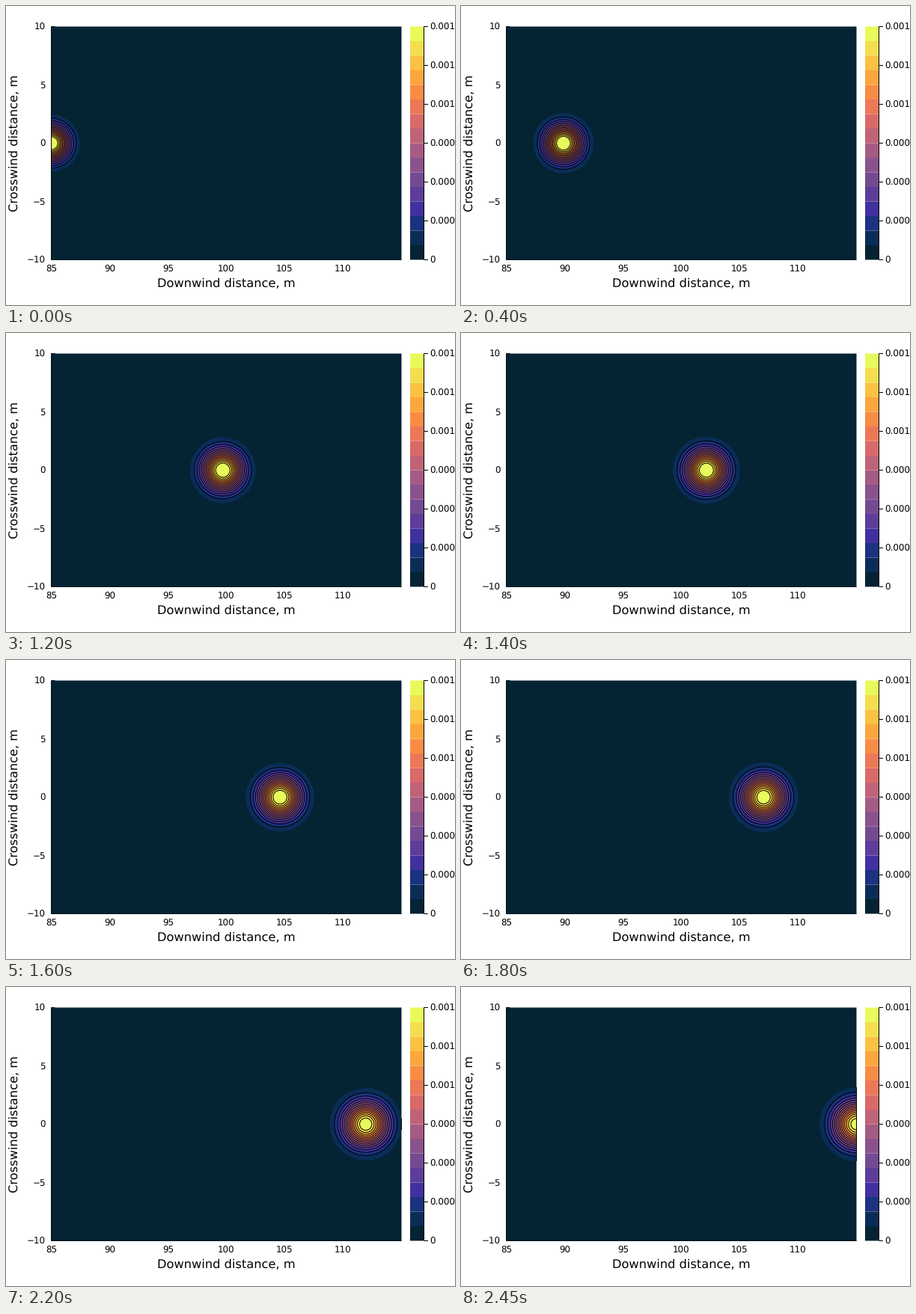
Animation, 600 px wide and 400 px high, one loop 2.5 s. Source, as a matplotlib script:

```python
import numpy as np
import matplotlib.pyplot as plt
from matplotlib.animation import FuncAnimation
from matplotlib.patches import Circle, Rectangle

plt.rcParams["font.family"] = "DejaVu Sans"
plt.rcParams["text.hinting"] = "none"

FRAMES = 50
PX = 0.72                      # one pixel in points at 100 dpi
SCALE = 15.6                   # pixels per metre
LEFT, RIGHT, TOP, BOTTOM = 60.5, 528.5, 27.5, 339.5
MID = (TOP + BOTTOM) / 2
DROP = 4.7                     # from a tick to its label's baseline

COLORS = ["#042333", "#092d57", "#1b3280", "#40319f", "#5d3d99", "#744a92",
          "#8b528c", "#a55b84", "#bf6377", "#d86a69", "#eb7958", "#f88c46",
          "#fca63d", "#fac142", "#f3de4f", "#e8fa5b"]
BANDS = len(COLORS)

fig = plt.figure(figsize=(6, 4), dpi=100, facecolor="white")
ax = fig.add_axes([0, 0, 1, 1])
ax.set_xlim(0, 600)
ax.set_ylim(400, 0)
ax.axis("off")


def line(xs, ys, z):
    return ax.plot(xs, ys, color="black", lw=PX, solid_capstyle="butt",
                   snap=False, zorder=z)[0]


def box(x0, y0, x1, y1, color, z=1):
    patch = Rectangle((x0, y0), x1 - x0, y1 - y0, fc=color, ec="none", lw=0,
                      snap=False, zorder=z)
    return ax.add_patch(patch)


def label(x, y, text, ha="center", size=11.85, rotation=0):
    ax.text(x, y, text, ha=ha, va="baseline", fontsize=size * PX,
            rotation=rotation, rotation_mode="anchor", color="black")


# Plot area and axes
area = box(LEFT, TOP, RIGHT, BOTTOM, COLORS[0])
line([LEFT, RIGHT], [BOTTOM, BOTTOM], 0.5)
line([LEFT, LEFT], [TOP, BOTTOM], 0.5)
line([LEFT, LEFT + 5], [TOP, TOP], 0.5)
for value in range(85, 111, 5):
    label(LEFT + (value - 85) * SCALE, 355.7, str(value))
for value in range(-10, 11, 5):
    label(53, MID - value * SCALE + DROP, str(value).replace("-", "\u2212"), "right")
label(294.3, 375.8, "Downwind distance, m", size=16.25)
label(16.5, MID, "Crosswind distance, m", size=16.25, rotation=90)

# Colour bar
step = (BOTTOM - TOP) / BANDS
for k, color in enumerate(COLORS):
    y = BOTTOM - k * step
    box(540, y - step, 558, y, color)
line([558.5, 558.5], [TOP, BOTTOM], 3)
for k in range(7):
    y = BOTTOM - 52 * k
    line([558.5, 564], [y, y], 3)
    label(566, y + DROP, f"{k * 0.00025:.5f}" if k else "0", "left")

# Puff: one disc per contour level, outlined above the lowest
discs = []
for k in range(1, BANDS):
    disc = Circle((0, 0), 1, fc=COLORS[k], ec="black" if k > 1 else "none",
                  lw=PX, zorder=2 + k * 0.01)
    ax.add_patch(disc)
    disc.set_clip_path(area)
    discs.append(disc)
edges = [line([x, x], [MID, MID], 4) for x in (LEFT, RIGHT)]


def log_peak(x):
    """Ground-level puff maximum for a release 1.53 m high."""
    sigma_z = 0.05 * x ** 0.61
    return -2.39 * np.log(x) - 1.53 ** 2 / (2 * sigma_z ** 2)


def draw(i):
    x = 85 + 30 * i / (FRAMES - 1)
    cx = LEFT + (x - 85) * SCALE
    sigma = 0.0197 * x ** 0.89 * SCALE
    peak = 1.085 * np.exp(log_peak(x) - log_peak(85))
    for k, disc in enumerate(discs, 1):
        ratio = peak * BANDS / k
        disc.set_visible(ratio > 1)
        disc.center = (cx, MID)
        disc.set_radius(sigma * np.sqrt(2 * np.log(max(ratio, 1))))
    # The cut side of the puff is outlined too
    for edge, x_edge in zip(edges, (LEFT, RIGHT)):
        reach = discs[0].get_radius() ** 2 - (x_edge - cx) ** 2
        half = np.sqrt(max(reach, 0))
        edge.set_ydata([MID - half, MID + half])
        edge.set_visible(reach > 0)
    return discs + edges


anim = FuncAnimation(fig, draw, frames=FRAMES, interval=50, repeat=True,
                     repeat_delay=0, blit=False)
plt.show()
```
